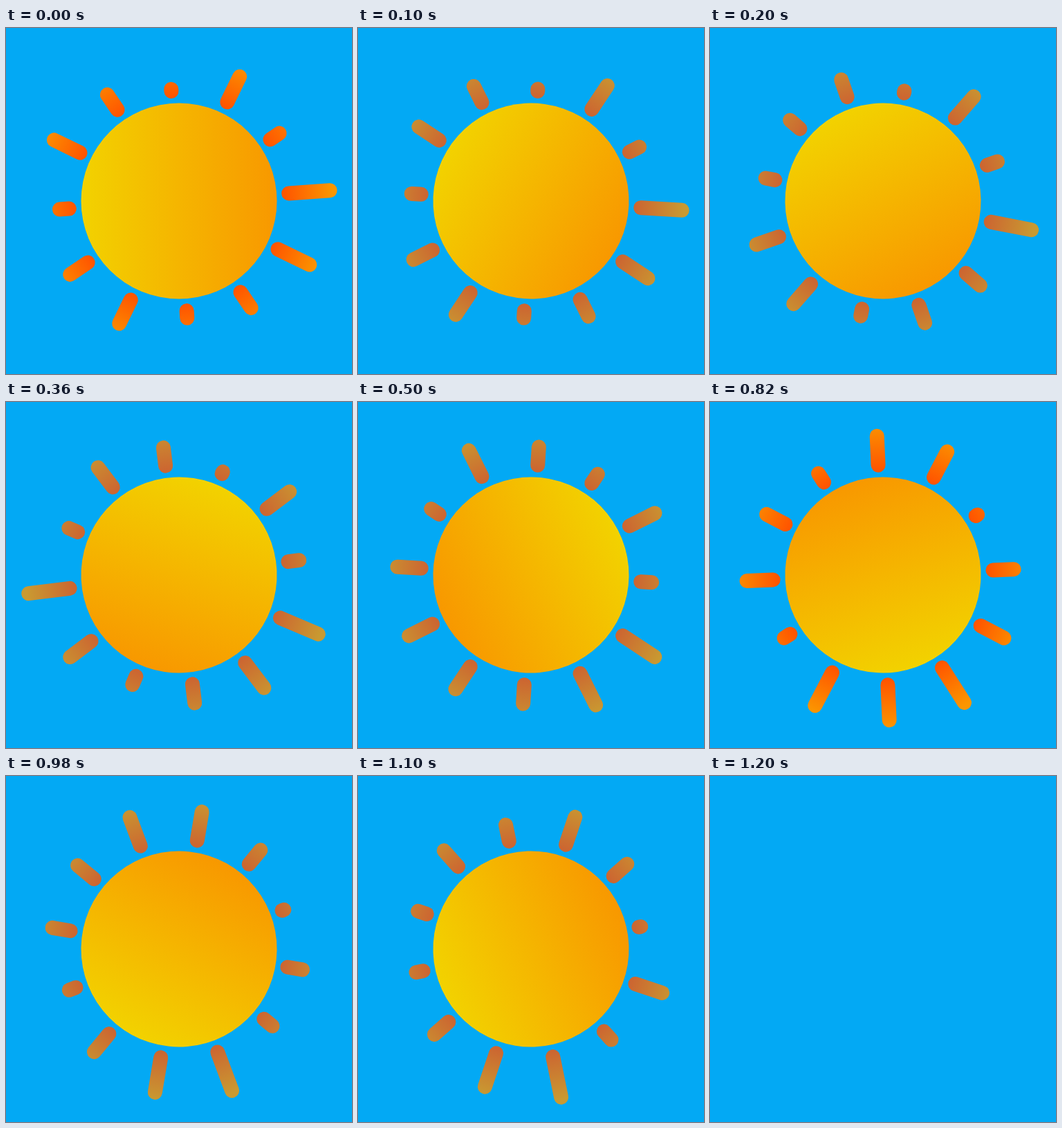
Recreate the animation shown at these times as an HTML page with a canvas. Size 500x500 px, loop 1.22 s.

```html
<!DOCTYPE html>
<html lang="en">
<head>
<meta charset="utf-8">
<title>Sun</title>
<style>
  html, body { margin: 0; width: 100%; height: 100%; overflow: hidden; background: #03a9f4; }
  canvas { display: block; width: 500px; height: 500px; }
</style>
</head>
<body>
<canvas id="stage" width="500" height="500"></canvas>
<script>
const ctx = document.getElementById('stage').getContext('2d');
const LOOP = 1220, STEP = 20, BLANK = 1200;
const SUN_R = 141.5, RAY_START = 159, RAY_WIDTH = 21;
const SPIN = 0.075, SUN_SPIN = 0.305; // degrees per ms
const RAMP = 170, GROW = 31, SHRINK = -28, LONG = 195;
const rad = deg => deg * Math.PI / 180;

// Each ray rests at one tip radius and pulses once, peaking at the given ms
const rays = [
  { rest: 218.6, peak: 645 }, { rest: 210, peak: 225 },
  { rest: 186.3, peak: 845 }, { rest: 169.4, peak: 515 },
  { rest: 197, peak: 1080 }, { rest: 189.8, peak: 350 },
  { rest: 173, peak: 985 }, { rest: 201, peak: 230 },
  { rest: 185.3, peak: 735 }, { rest: 162, peak: 600 },
  { rest: 200, peak: 925 }, { rest: 175, peak: 772 }
];

// Long rays shrink, short rays grow
function tipRadius({ rest, peak }, t) {
  const level = Math.max(0, 1 - Math.abs(t - peak) / RAMP);
  return rest + level * (rest > LONG ? SHRINK : GROW);
}

function fade(gradient, from, to) {
  gradient.addColorStop(0, from);
  gradient.addColorStop(1, to);
  return gradient;
}

const rayFill = fade(ctx.createRadialGradient(0, 0, 152, 0, 0, 222), '#ff5500', '#fb9600');
const sunFill = fade(ctx.createLinearGradient(-SUN_R, 0, SUN_R, 0), '#f2d200', '#f89800');

function drawRays(t) {
  const bright = t < 100 || (t >= 760 && t < 900);
  ctx.save();
  ctx.globalAlpha = bright ? 1 : 0.8;
  ctx.strokeStyle = rayFill;
  ctx.lineWidth = RAY_WIDTH;
  ctx.lineCap = 'round';
  ctx.rotate(rad(t * SPIN - 4));
  for (const ray of rays) {
    ctx.beginPath();
    ctx.moveTo(RAY_START, 0);
    ctx.lineTo(tipRadius(ray, t), 0);
    ctx.stroke();
    ctx.rotate(rad(360 / rays.length));
  }
  ctx.restore();
}

function drawSun(t) {
  ctx.save();
  ctx.rotate(rad(t * SUN_SPIN));
  ctx.fillStyle = sunFill;
  ctx.beginPath();
  ctx.arc(0, 0, SUN_R, 0, Math.PI * 2);
  ctx.fill();
  ctx.restore();
}

function draw(t) {
  ctx.clearRect(0, 0, 500, 500);
  if (t >= BLANK) return;
  ctx.save();
  ctx.translate(250, 250);
  drawRays(t);
  drawSun(t);
  ctx.restore();
}

const start = performance.now();
function tick() {
  const t = (performance.now() - start) % LOOP;
  draw(Math.floor(t / STEP) * STEP);
  requestAnimationFrame(tick);
}
tick();
</script>
</body>
</html>
```
